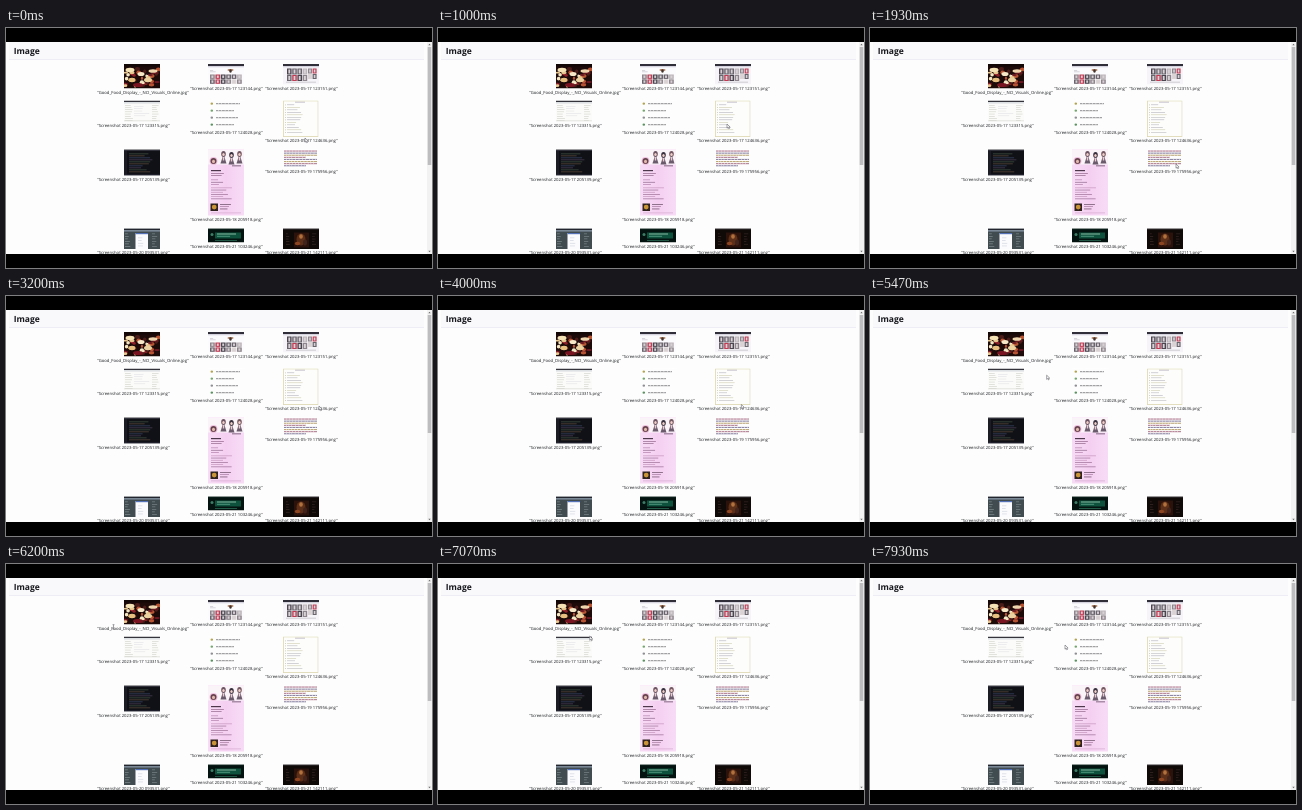
Animation of 426 by 240 pixels, one loop 8000 ms. Source, as an HTML page with a canvas:

```html
<!DOCTYPE html>
<html lang="en">
<head>
<meta charset="utf-8">
<title>Image</title>
<style>
  html, body { margin: 0; width: 100%; height: 100%; overflow: hidden; background: #000; }
  canvas { display: block; width: 426px; height: 240px; }
</style>
</head>
<body>
<canvas></canvas>
<script>
const canvas = document.querySelector('canvas');
const ratio = window.devicePixelRatio || 1;
canvas.width = 426 * ratio;
canvas.height = 240 * ratio;
const ctx = canvas.getContext('2d');
ctx.textRendering = 'geometricPrecision';

const LOOP = 8000;
const hash = n => { const v = Math.sin(n * 127.1 + 3.7) * 43758.5; return v - Math.floor(v); };

function rect(x, y, w, h, color) {
  ctx.fillStyle = color;
  ctx.fillRect(x, y, w, h);
}

function dot(x, y, rx, ry, color) {
  ctx.fillStyle = color;
  ctx.beginPath();
  ctx.ellipse(x, y, rx, ry, 0, 0, 7);
  ctx.fill();
}

function polygon(points, color) {
  ctx.fillStyle = color;
  ctx.beginPath();
  for (const [x, y] of points) ctx.lineTo(x, y);
  ctx.closePath();
  ctx.fill();
}

function text(str, x, y, font, color) {
  ctx.font = font;
  ctx.fillStyle = color;
  ctx.fillText(str, x, y);
}

// Rows of uneven bars that stand for tiny writing.
function lines(x, y, width, count, step, colors, thickness = 0.7) {
  for (let i = 0; i < count; i++) {
    const length = width * (0.45 + 0.55 * hash(i + x + y));
    rect(x, y + i * step, length, thickness, colors[i % colors.length]);
  }
}

function clipped(x, y, w, h, color, paint) {
  ctx.save();
  ctx.translate(x, y);
  ctx.beginPath();
  ctx.rect(0, 0, w, h);
  ctx.clip();
  rect(0, 0, w, h, color);
  paint(w, h);
  ctx.restore();
}

function food() {
  const tones = ['#e8c78f', '#8e1f28', '#f4e7c4', '#4b1c18', '#b65332', '#250c0d', '#6c1822'];
  for (let i = 0; i < 42; i++) {
    dot(1 + hash(i) * 34, 5 + hash(i + 40) * 18, 1 + hash(i + 80) * 2, 0.8 + hash(i + 9) * 1.2, tones[i % 7]);
  }
  dot(6, 6, 4.5, 2.2, '#f5e3b6');
  dot(29, 7, 4.5, 1.8, '#efd5ae');
  dot(17, 10, 3.5, 2, '#f7e8c8');
  dot(8, 16, 3.5, 2.2, '#e7bf7f');
  dot(24, 16, 4, 2.2, '#ecd2a0');
  dot(14, 21, 5, 2, '#7a1422');
  rect(0, 0, 36, 2.5, '#140807');
}

function browserBar() {
  rect(0, 0, 36, 2, '#302e38');
  rect(0, 2, 36, 1.3, '#d5d4de');
}

function tiles(x, y, columns, w, h) {
  const tones = ['#69636c', '#bcb5ba', '#4b4550', '#c03c55', '#8e858c', '#dcd4d5'];
  for (let i = 0; i < columns * 2; i++) {
    const left = x + (i % columns) * (w + 0.6);
    const top = y + Math.floor(i / columns) * (h + 0.5);
    rect(left, top, w, h, tones[Math.floor(hash(i + x) * 6)]);
    rect(left + w * 0.3, top + 1, w * 0.4, h - 2, '#d8d2d6');
  }
}

function shop() {
  browserBar();
  dot(22.5, 6, 3.2, 1, '#a87758');
  dot(22.5, 7, 1.3, 1.7, '#43332d');
  lines(2, 6, 7, 2, 1.5, ['#c9c7d0']);
  tiles(2, 10.5, 6, 4.8, 4.4);
}

function gallery() {
  browserBar();
  tiles(4, 4.5, 4, 4.6, 6);
  tiles(25, 4.5, 2, 4, 5);
  rect(3, 17.6, 30, 1.2, '#d5d2d8');
}

function table() {
  rect(0, 0, 36, 1.6, '#34333c');
  rect(0, 1.6, 36, 1.5, '#dce0e4');
  for (let y = 4.5; y < 20; y += 2.2) {
    rect(1, y, 5 + hash(y) * 3, 0.5, '#c9c8bf');
    rect(28, y, 4 + hash(y + 5) * 3, 0.5, '#c9c8bf');
  }
  lines(10, 5.5, 16, 5, 2.4, ['#dcdce2'], 0.5);
  rect(0, 20, 36, 1, '#d9dad4');
}

function contacts() {
  ['#b2a450', '#75a66f', '#8f8f93', '#5d9360'].forEach((color, i) => {
    const y = 3.2 + i * 7;
    dot(3.8, y, 1.3, 1.1, color);
    rect(8, y - 0.5, [24, 18, 22, 18][i], 1, '#8d8d8f');
    for (let x = 10; x < 31; x += 3.4) rect(x, y - 0.6, 0.6, 1.2, '#ffffff');
  });
}

function menu(w, h) {
  lines(4, 4, 16, 12, 2.5, ['#b4b4be', '#cfcbb0', '#bcbcc4'], 0.6);
  for (let i = 0; i < 12; i++) rect(2, 4 + i * 2.5, 0.8, 0.8, '#bdbaa0');
  rect(12, 1.2, 10, 0.8, '#b3b0bd');
  ctx.strokeStyle = '#dcd8ae';
  ctx.lineWidth = 0.8;
  ctx.strokeRect(0.4, 0.4, w - 0.8, h - 0.8);
}

function code() {
  rect(0, 0, 36, 1.5, '#30313a');
  rect(0, 1.5, 3, 24, '#1c1d24');
  lines(5, 4, 24, 10, 2, ['#3f5140', '#5c4b3a', '#384666', '#4c3f58']);
  rect(0, 25, 36, 1, '#2b2d3c');
}

function figure(x, y, hair) {
  dot(x, y + 3.5, 2.3, 3, hair);
  dot(x, y + 4, 1.2, 1.6, '#f0cfc8');
  polygon([[x - 0.8, y + 6], [x + 0.8, y + 6], [x + 3, y + 13], [x - 3, y + 13]], '#6a5a6c');
  rect(x - 0.7, y + 6.5, 1.4, 3.5, '#eccbd0');
}

function profile(w, h) {
  const glow = ctx.createLinearGradient(0, 0, w, 0);
  glow.addColorStop(0, '#f7dcf6');
  glow.addColorStop(0.5, '#f5cff1');
  glow.addColorStop(1, '#f7dcf6');
  rect(0, 0, w, h, glow);
  rect(0, 0, 36, 15, '#faf3f8');
  figure(15.5, 1, '#6d5361');
  figure(23.5, 2, '#39303e');
  figure(31.5, 1, '#745861');
  dot(5.5, 11.5, 4, 4, '#f0c3e1');
  dot(5.5, 11.5, 3, 3, '#68434e');
  dot(5.5, 12, 1.5, 1.7, '#e2b9ae');
  rect(24, 15.5, 9, 1.5, '#a98ca8');
  rect(3, 20.5, 10, 1.2, '#4d374b');
  lines(3, 23.5, 13, 2, 2, ['#93688b']);
  lines(3, 30, 14, 3, 2.4, ['#b481ad', '#91698d']);
  lines(3, 38, 23, 6, 2.2, ['#c596be', '#9c7097']);
  rect(2.5, 54, 7.5, 7.5, '#30231f');
  dot(6.2, 57.6, 2.4, 2.4, '#c9943a');
  lines(12, 54.5, 14, 3, 2.3, ['#664a62', '#a57ca0']);
  rect(3, 63, 30, 0.8, '#dab0d4');
}

function paragraphs() {
  for (let i = 0; i < 8; i++) {
    const y = 1 + i * 2.1;
    rect(1, y, i === 3 || i === 7 ? 22 : 33, 1.1, ['#b27d92', '#8e87a6', '#bda878'][i % 3]);
    for (let x = 3; x < 33; x += 2.6 + hash(x + i)) rect(x, y, 0.5, 1.1, '#ffffff');
  }
}

function phone() {
  rect(0, 0, 36, 1.5, '#23262e');
  rect(0, 1.5, 36, 1.6, '#7a8795');
  lines(1, 5, 6, 6, 2.5, ['#7f8c8e']);
  lines(28, 5, 6, 6, 2.5, ['#788488']);
  rect(11.5, 4.5, 12.5, 17, '#fbfbfd');
  rect(11.5, 4.5, 12.5, 1.2, '#5471b8');
  lines(14, 9, 6, 4, 2.7, ['#d5d7e2']);
}

function terminal() {
  rect(0, 0, 36, 1.5, '#0a1c17');
  rect(7, 4, 26, 6, '#0e523e');
  lines(9, 5, 23, 2, 2.3, ['#84b89e', '#4d927a'], 1);
  dot(4, 6, 1.5, 1.5, '#3b7d66');
  rect(7, 11.5, 22, 1, '#205845');
}

function player() {
  rect(0, 0, 36, 1.2, '#2b2628');
  rect(11, 4, 15, 15, '#2b130c');
  dot(18, 11, 4.5, 6, '#5d2f18');
  dot(18, 8, 1.8, 2.3, '#b0713c');
  dot(14.5, 15, 2.8, 1.8, '#8b4521');
  dot(22, 14, 2, 3, '#40231a');
  lines(3, 5, 4, 5, 2.6, ['#3c2a26']);
  lines(29, 5, 5, 5, 2.6, ['#352622']);
}

const shot = stamp => `"Screenshot 2023-05-${stamp}.png"`;
const columns = [{ image: 118, label: 91 }, { image: 202, label: 184 }, { image: 277, label: 259 }];

// column, top, width, height, background, painter, caption
const items = [
  [0, 36, 36, 24.5, '#1d0b0a', food, '"Good_Food_Display_-_NCI_Visuals_Online.jpg"'],
  [1, 36, 36, 20.5, '#fbfafc', shop, shot('17 123144')],
  [2, 36, 36, 20.5, '#f6f4f8', gallery, shot('17 123151')],
  [0, 72.5, 36, 21, '#fbfbf9', table, shot('17 123315')],
  [1, 72.5, 36, 28.5, '#fdfdfd', contacts, shot('17 124028')],
  [2, 72.5, 35.5, 36.5, '#fdfdfb', menu, shot('17 124636')],
  [0, 121.5, 36, 26, '#101116', code, shot('17 205139')],
  [1, 121.5, 36, 66, '#f5cff1', profile, shot('18 205918')],
  [2, 121.5, 35, 18, '#fdfdfd', paragraphs, shot('19 175956')],
  [0, 200.5, 36, 20.5, '#414c50', phone, shot('20 093531')],
  [1, 200.5, 36, 14, '#04130f', terminal, shot('21 103246')],
  [2, 200.5, 36, 20.5, '#0f0908', player, shot('21 142111')]
];

function page() {
  rect(0, 0, 426, 240, '#000');
  ctx.save();
  ctx.beginPath();
  ctx.rect(0, 14, 426, 212);
  ctx.clip();
  rect(0, 14, 426, 212, '#fdfdfd');
  rect(3, 14, 415, 17, '#f9f8fb');
  rect(3, 31, 415, 0.8, '#ebe9f3');
  text('Image', 7.7, 25.5, '700 8.5px "Open Sans", sans-serif', '#17191d');
  for (const [column, top, w, h, color, paint, caption] of items) {
    const { image, label } = columns[column];
    clipped(image, top, w, h, color, paint);
    text(caption, label, top + h + 5.3, '4.24px "Open Sans", sans-serif', '#1c1e22');
  }
  rect(421, 14, 5, 212, '#f2f2f2');
  rect(421.7, 19, 3.6, 118, '#bdbdbf');
  for (const [y, dir] of [[16.5, -1], [223.5, 1]]) {
    polygon([[422.3, y - dir * 0.7], [424.7, y - dir * 0.7], [423.5, y + dir * 0.8]], '#66666a');
  }
  ctx.restore();
}

// time, x, y
const route = [
  [0, 299, 110], [1000, 289, 96], [1930, 306, 136], [3200, 313, 110],
  [4400, 300, 108], [6200, 107.5, 63], [7930, 195, 81], [8000, 195, 81]
];

function pointerAt(time) {
  const i = route.findIndex(stop => stop[0] > time);
  const [t0, x0, y0] = route[i - 1];
  const [t1, x1, y1] = route[i];
  const p = (time - t0) / (t1 - t0);
  const e = p * p * (3 - 2 * p);
  return [x0 + (x1 - x0) * e, y0 + (y1 - y0) * e];
}

function pointer(x, y) {
  const overText = items.some(([column, top, , h, , , caption]) => {
    const left = columns[column].label;
    const dy = y - top - h;
    return x > left && x < left + caption.length * 2.1 && dy > 1 && dy < 6;
  });
  ctx.strokeStyle = '#66666c';
  ctx.lineWidth = 0.6;
  ctx.beginPath();
  if (overText) {
    for (const end of [-2.3, 2.3]) {
      ctx.moveTo(x - 1, y + end);
      ctx.lineTo(x + 1, y + end);
    }
    ctx.moveTo(x, y - 2.3);
    ctx.lineTo(x, y + 2.3);
  } else {
    polygon([[x, y], [x, y + 4.2], [x + 1.1, y + 3.3], [x + 1.8, y + 4.8],
      [x + 2.4, y + 4.5], [x + 1.8, y + 3.1], [x + 3.1, y + 3]], '#fff');
  }
  ctx.stroke();
}

function draw() {
  ctx.setTransform(ratio, 0, 0, ratio, 0, 0);
  page();
  pointer(...pointerAt(performance.now() % LOOP));
  requestAnimationFrame(draw);
}
draw();
</script>
</body>
</html>
```
